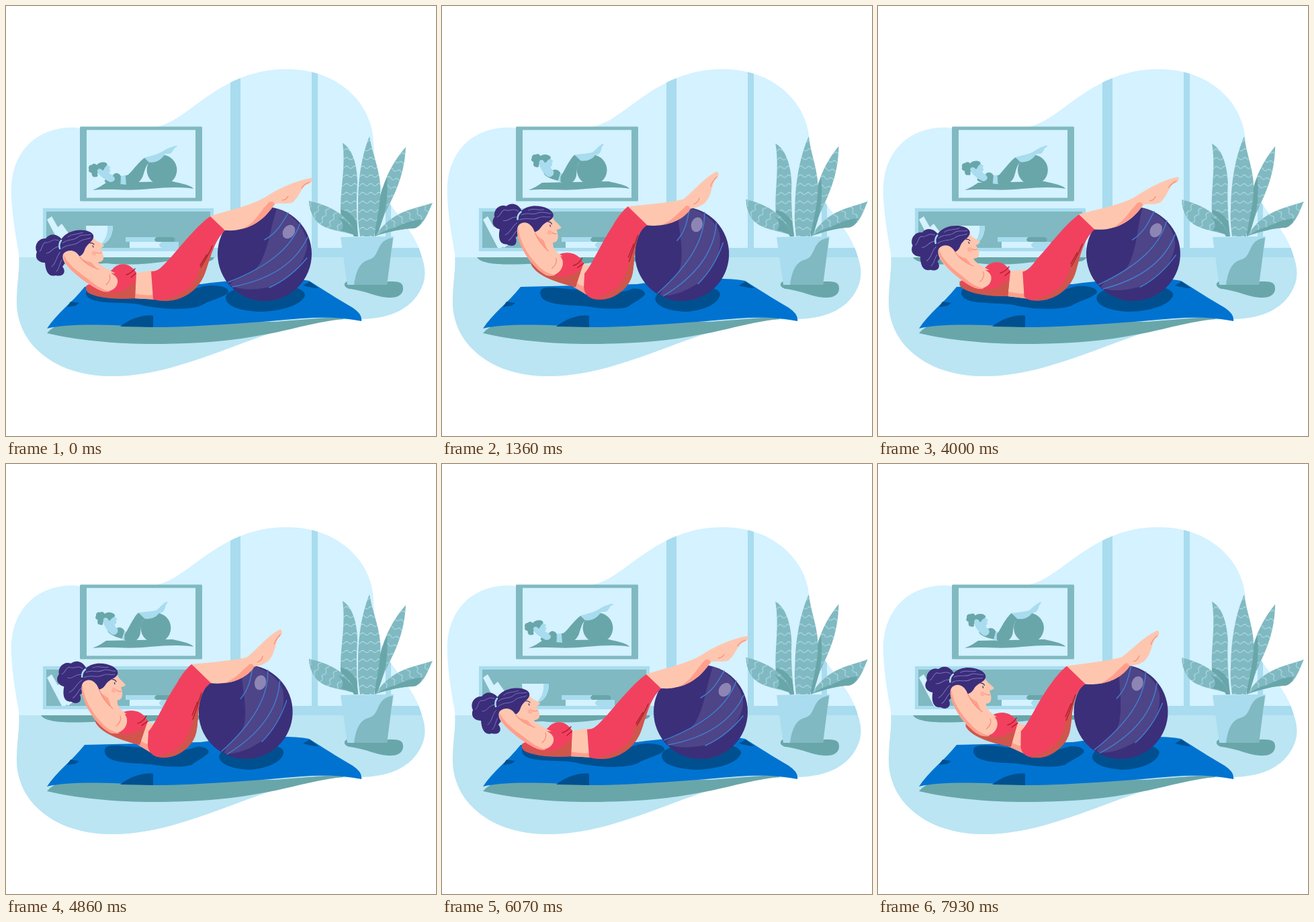
An HTML page that plays this animation: 640x640 px, repeating every 8 s.

```html
<!DOCTYPE html>
<html lang="en">
<head>
<meta charset="utf-8">
<title>Ball crunches</title>
<style>
  html, body { margin: 0; height: 100%; overflow: hidden; background: #fff; }
  svg { display: block; width: 100vw; height: 100vh; }
  .wall { fill: #d4f2ff; }
  .floor { fill: #bbe5f3; }
  .frame { fill: #a8dcee; }
  .teal { fill: #80b9c1; }
  .deep { fill: #69a6aa; }
  .mat { fill: #0073d1; }
  .matDark { fill: #00508f; }
  .wave { fill: none; stroke: #b5dfeb; stroke-width: 1.1; }

  .person { --skin: #ffc6af; --blush: #ff9f8c; --red: #f2415f; --redShade: #d0564c; --hair: #3b2d7a;
    --ball: #3b2f7a; --ballLight: #4e4488; --gloss: #8d86b5; --detail: 1; }
  .mini { --skin: #a8dcee; --blush: #a8dcee; --red: #69a6aa; --redShade: #69a6aa; --hair: #69a6aa;
    --ball: #69a6aa; --ballLight: #69a6aa; --gloss: #69a6aa; --detail: 0; }
  .skin { fill: var(--skin); }
  .blush { fill: var(--blush); }
  .red { fill: var(--red); }
  .redShade { fill: var(--redShade); }
  .hair { fill: var(--hair); }
  .ball { fill: var(--ball); }
  .ballLight { fill: var(--ballLight); }
  .gloss { fill: var(--gloss); }
  .line { fill: none; stroke-width: 1.2; stroke-linecap: round; stroke-linejoin: round; opacity: var(--detail); }
  .strand { stroke: #7772b8; stroke-width: 1; }
  .stripe { stroke: #437ccb; stroke-width: 1.5; }
  .fold { stroke: #b3202f; stroke-width: 1.5; }
  .crease { stroke: #f58c7c; }
  .tie { stroke: #a8dcee; stroke-width: 2.5; }
  .ink { stroke: #33265f; }
</style>
</head>
<body>
<svg viewBox="0 0 640 640">
  <defs>
    <clipPath id="room">
      <path d="M8 283C4 225 40 178 105 181C150 190 190 187 228 179C278 165 320 94 418 94C495 94 545 145 547 203C549 245 558 275 572 295C590 320 612 345 619 374C625 392 624 402 621 413C609 448 575 466 525 466C470 466 430 474 385 490C310 516 235 551 157 551C70 551 13 500 16 435C17 405 21 390 19 368C15 345 9 312 8 283Z"/>
    </clipPath>
    <pattern id="waveFlat" width="12" height="13" patternUnits="userSpaceOnUse">
      <path class="wave" d="M0 6q3-3.500 6 0t6 0"/>
    </pattern>
    <pattern id="waveRight" href="#waveFlat" patternTransform="rotate(62)"/>
    <pattern id="waveLeft" href="#waveFlat" patternTransform="rotate(-62)"/>
    <pattern id="waveTilt" href="#waveFlat" patternTransform="rotate(14)"/>
  </defs>

  <g clip-path="url(#room)">
    <rect class="wall" width="640" height="640"/>
    <path class="frame" d="M334 90h15v270h-15zM455 90h9v270h-9zM565 280h8v80h-8zM300 360h340v14H300z"/>
    <rect class="floor" y="374" width="640" height="266"/>
  </g>

  <!-- television and cabinet -->
  <rect class="teal" x="110" y="179.500" width="182" height="111" rx="1.500"/>
  <rect class="wall" x="120" y="184.500" width="162" height="101"/>
  <path class="deep" d="M129 274C137 271 143 267 149 263L248 261C258 264 275 266 279 272C260 269 240 270 215 272C180 276 155 271 129 274Z"/>
  <path class="deep" d="M52 374H310C306 386 280 378 250 378C215 385 175 386 150 383C115 384 62 389 52 374Z"/>
  <rect class="frame" x="55" y="301" width="254" height="64"/>
  <rect class="teal" x="60" y="306" width="244" height="54"/>
  <path class="wall" d="M61 318L68 313L93 357L88 360H83ZM75 331L83 324L103 352L92 360ZM119 327H159C159 347 148 355 138 356C127 353 119 342 119 327ZM184 351H257V360H184Z"/>
  <path class="frame" d="M151 327H159C159 345 149 354 140 356C148 348 152 340 151 327ZM178 344H228V351H178ZM232 351H257V360H232Q224 356 232 351Z"/>
  <path class="deep" d="M224 344H248Q254 347 250 351H224Q218 348 224 344Z"/>

  <!-- plant -->
  <path class="deep" d="M507 410C501 414 504 420 512 421C540 425 552 434 572 434C590 434 593 423 590 415C586 409 577 410 566 410Z"/>
  <g data-sway="-2 522 342">
    <path class="teal" d="M501 204C515 212 523 235 523 265C521 290 522 320 524 343H518C514 332 498 325 498 305C497 275 506 240 501 204Z"/>
    <path fill="url(#waveFlat)" d="M501 204C515 212 523 235 523 265C521 290 522 320 524 343H518C514 332 498 325 498 305C497 275 506 240 501 204Z"/>
    <path class="deep" d="M498 303C505 304 515 309 522 321L524 343H518C514 332 498 325 498 303Z"/>
  </g>
  <g data-sway="-2 550 342">
    <path class="teal" d="M595 210C573 235 550 275 549 343L553 341C560 302 592 275 595 210Z"/>
    <path fill="url(#waveTilt)" d="M595 210C573 235 550 275 549 343L553 341C560 302 592 275 595 210Z"/>
    <path class="deep" d="M567 256C556 280 549 310 549 343L553 341C560 317 570 300 567 256Z"/>
  </g>
  <g data-sway="1.9 538 342">
    <path class="teal" d="M541 194C533 213 523 250 524 300C523 320 526 335 527 343H548C553 310 560 285 556 257C553 235 546 222 541 194Z"/>
    <path fill="url(#waveFlat)" d="M541 194C533 213 523 250 524 300C523 320 526 335 527 343H548C553 310 560 285 556 257C553 235 546 222 541 194Z"/>
  </g>
  <g data-sway="-1.6 550 342">
    <path class="teal" d="M635 293C610 302 575 303 550 342C570 336 590 331 607 331C622 328 629 305 635 293Z"/>
    <path fill="url(#waveRight)" d="M635 293C610 302 575 303 550 342C570 336 590 331 607 331C622 328 629 305 635 293Z"/>
    <path class="deep" d="M620 318C605 318 592 324 578 330C566 333 560 337 550 342C570 336 590 331 607 331C613 330 617 325 620 318Z"/>
  </g>
  <g data-sway="1.8 522 342">
    <path class="teal" d="M451 290C472 295 508 305 522 342C500 334 475 335 461 319C453 308 451 298 451 290Z"/>
    <path fill="url(#waveLeft)" d="M451 290C472 295 508 305 522 342C500 334 475 335 461 319C453 308 451 298 451 290Z"/>
    <path class="deep" d="M494 314C508 319 518 330 522 342C514 339 506 336 498 334C505 328 500 320 494 314Z"/>
  </g>
  <path class="frame" d="M498 344L577 343L567 415H508Z"/>
  <path class="teal" d="M576 345C550 348 557 372 542 377C525 381 521 396 518 415H567Z"/>

  <!-- mat -->
  <path class="deep" d="M61 487Q70 476 90 470H400L502 462V466C460 470 430 481 385 489C340 498 290 502 250 502.500C185 505 110 499 61 487Z"/>
  <path class="mat" d="M61 480C75 458 100 440 117 418L290 414C350 406 420 403 451 409C475 424 500 440 516 449Q531 459 529 469C500 463 470 463 440 465C360 472 280 478 220 478C150 474 95 472 61 480Z"/>
  <path class="matDark" d="M96 440L109 442L104 446L91 448ZM170 477C185 465 205 459 219 461V478ZM442 416C450 418 458 420 465 420L452 410Z"/>
  <path class="matDark" d="M119 427C120 412 150 416 190 424C240 428 270 425 290 418C310 413 334 418 331 426C325 434 305 437 290 446C270 453 235 452 205 446C185 438 120 448 119 427Z"
    data-to="M147 428C145 414 170 420 200 422C235 428 265 428 280 422C290 418 304 424 301 430C296 436 285 441 276 448C262 452 240 451 215 447C195 445 148 447 147 428Z"/>
  <path class="matDark" d="M327 435C327 422 350 418 385 416C420 414 446 420 445 431C440 445 410 455 375 455C345 453 328 446 327 435Z"
    data-to="M317 436C318 424 340 420 365 417C395 415 414 421 413 430C410 445 385 454 362 455C335 454 318 446 317 436Z"/>

  <g class="person"><g id="athlete">
    <g id="ball">
      <circle class="ball" cx="385" cy="369" r="70"/>
      <path class="ballLight" d="M403 302C392 335 392 357 378 383C366 403 345 400 333 415C352 426 380 421 398 417C417 405 441 393 448 360C451 337 428 308 403 302Z"/>
      <path class="line stripe" d="M420 308C410 325 403 338 385 348M438 323C425 360 390 388 331 411M449 344C430 385 390 408 337 418M448 375C430 397 410 411 392 419"/>
      <ellipse class="gloss" cx="421" cy="336" rx="8.500" ry="11" transform="rotate(35 421 336)"/>
    </g>

    <!-- legs -->
    <path class="skin" d="M303 313C335 303 365 297 385 285C405 272 430 260 455 256C457 260 454 264 447 266C440 270 436 284 427 292C418 296 408 292 400 295C392 306 378 326 350 332C340 335 332 334 325 334Z"
      data-to="M276 298C305 295 335 293 358 288C375 275 388 256 408 246C412 249 411 254 405 259C400 268 400 286 389 294C381 300 376 300 369 302C362 314 345 324 325 326C316 327 310 327 304 326Z"/>
    <path class="blush" d="M350 332C370 325 376 308 388 296C392 290 397 289 400 295C392 306 378 326 350 332Z"
      data-to="M325 326C342 320 350 308 360 300C363 296 367 296 369 302C362 314 345 324 325 326Z"/>
    <path class="line crease" d="M411 289Q417 289 420 283M440 271Q443 265 452 262" data-to="M374 295Q380 293 382 286M399 268Q401 261 408 254"/>

    <!-- waist and trousers -->
    <path class="skin" d="M190 398L220 393L226 437L190 435Z" data-to="M207 382L222 388L216 430L195 417Z"/>
    <path class="blush" d="M191 428C202 430 212 431 222 430L226 437L190 435Z" data-to="M199 410C203 414 208 417 214 417L216 430L195 417Z"/>
    <path class="red" d="M216 395C225 395 230 390 235 385C255 365 280 330 304 313L326 334C308 352 305 375 296 398C285 425 262 438 240 439C228 439 222 438 219 436Z"
      data-to="M212 398C222 388 235 355 255 325C262 312 270 303 276 298L305 326C290 335 287 355 285 385C283 415 262 437 235 437C218 437 210 428 211 415Z"/>
    <path class="redShade" d="M310 352C298 368 290 380 285 400C276 425 250 434 227 438C255 442 285 428 296 398C303 380 303 365 310 352Z"
      data-to="M294 337C281 350 282 370 276 388C270 418 250 432 222 435C256 441 281 420 284 395C287 375 285 350 294 337Z"/>
    <path class="line fold" d="M307 357C302 370 297 377 290 389M299 370L289 386" data-to="M291 341C286 355 284 364 278 380M285 354L277 374"/>

    <!-- top and neck -->
    <path class="red" d="M120 416C128 412 150 402 161 389C170 382 184 381 194 397L192 435C165 437 135 435 121 426Z"
      data-to="M133 380C140 378 165 378 175 369C188 364 204 367 211 383L199 418C175 412 145 402 133 380Z"/>
    <path class="redShade" d="M119 416C135 427 165 432 180 420C186 415 190 413 193 408L192 435C165 437 130 434 119 423Z"
      data-to="M133 381C148 397 172 404 186 402C194 399 201 396 207 392L199 418C175 412 142 402 133 384Z"/>
    <path class="line fold" d="M192 391Q186 398 179 400M193 398L186 404" data-to="M209 375Q204 384 196 386M211 383L202 389"/>
    <path class="blush" d="M108 368L134 379C138 387 148 391 160 397L130 402Z" data-to="M138 335L165 350C163 360 168 366 178 372L150 376Z"/>
    <path class="skin" d="M120 374L136 380C140 387 150 391 163 398L140 396Z" data-to="M150 342L166 351C165 360 169 364 180 372L160 370Z"/>

    <g id="head">
      <path class="hair" d="M85 350C78 339 66 337 59 346C48 345 41 357 46 366C42 376 49 382 58 382C59 396 64 404 74 401C86 404 90 395 84 388C91 380 91 365 88 355Z"/>
      <path class="line strand" d="M78 349C68 345 66 354 58 352C53 354 54 363 50 365M78 358C68 360 68 368 60 368M82 365C74 372 76 382 68 388M83 378C79 384 80 390 75 395"/>
      <path class="skin" d="M126 339C130 345 134 350 138 351L146 356C145 359 142 360 140 361L143 366C146 372 147 380 139 381C128 384 118 379 108 374L95 350Z"/>
      <circle class="blush" cx="131" cy="368" r="3.500" opacity=".55"/>
      <path class="hair" d="M80 365C75 348 90 334 110 333.500C124 333 132 339 130 345C128 352 120 354 117 363C115 370 110 374 104 374L88 374Z"/>
      <path class="line strand" d="M84 353C92 346 101 350 107 344C113 339 120 342 126 340M83 361C93 353 102 358 109 351C115 346 120 348 126 345M92 344C99 338 106 341 114 337"/>
      <path class="line tie" d="M82 349Q78 354 80 361"/>
      <path class="line ink" d="M125 353Q129 352 131 355M129 357L130 359"/>
      <path class="line crease" d="M142 367Q138 369 135 367"/>
    </g>

    <!-- arm -->
    <path class="skin" d="M86 368C92 362 103 362 109 372C117 382 127 388 140 392C156 396 168 402 166 412C164 424 148 428 138 422C122 414 100 398 90 386C84 378 83 372 86 368Z"
      data-to="M115 325C122 318 133 321 138 334C142 346 150 356 160 364C174 366 182 374 180 385C177 398 164 403 155 400C138 390 124 372 117 352C112 340 111 330 115 325Z"/>
    <path class="blush" d="M86 370C91 384 109 397 123 407C133 415 142 422 155 425C148 427 140 424 132 419C115 409 82 386 86 370Z"
      data-to="M114 328C115 346 127 368 139 381C147 391 156 398 169 400C162 403 154 400 147 395C130 381 108 348 114 328Z"/>
    <path class="line crease" d="M110 374C118 384 128 389 138 392M154 400Q157 408 149 415" data-to="M139 336C143 347 151 357 159 364M170 375Q173 382 164 390"/>
  </g></g>
  <use class="mini" href="#athlete" transform="translate(108.800 125.900) scale(.32)"/>
</svg>

<script>
  const LOOP = 8000, STROKE = 1200, LEAD = 35;
  const NUMBER = /-?\d*\.?\d+/g;
  const lerp = (a, b, p) => a + (b - a) * p;
  const byId = id => document.getElementById(id);

  const morphs = [...document.querySelectorAll('[data-to]')].map(el => {
    const from = el.getAttribute('d');
    return { el, from, ends: el.dataset.to.match(NUMBER).map(Number) };
  });
  const leaves = [...document.querySelectorAll('[data-sway]')].map(el => {
    const [angle, x, y] = el.dataset.sway.split(' ').map(Number);
    return { el, angle, x, y };
  });

  // cubic-bezier(.68, 0, .32, 1), solved by bisection
  function ease(x) {
    let low = 0, high = 1;
    for (let i = 0; i < 20; i++) {
      const s = (low + high) / 2, r = 1 - s;
      if (3 * r * s * (.68 * r + .32 * s) + s ** 3 < x) low = s; else high = s;
    }
    return low * low * (3 - 2 * low);
  }

  // Rises for one stroke, falls for the next, then rests for the remainder.
  function swing(time, period) {
    const phase = ((time + LEAD) % period) / STROKE;
    return ease(Math.max(0, 1 - Math.abs(phase - 1)));
  }

  function draw(time) {
    const lift = swing(time, 3 * STROKE);
    const sway = swing(time, 2 * STROKE);

    for (const { el, from, ends } of morphs) {
      let i = 0;
      el.setAttribute('d', from.replace(NUMBER, n => lerp(+n, ends[i++], lift).toFixed(2)));
    }
    byId('ball').setAttribute('transform',
      `translate(${-28.5 * lift} 0) rotate(${-21 * lift} 385 369)`);
    byId('head').setAttribute('transform',
      `translate(${34 * lift} ${-36 * lift}) rotate(${15 * lift} 112 354)`);
    for (const { el, angle, x, y } of leaves) {
      el.setAttribute('transform', `rotate(${angle * sway} ${x} ${y})`);
    }
  }

  function tick() {
    draw(performance.now() % LOOP);
    requestAnimationFrame(tick);
  }
  tick();
</script>
</body>
</html>
```
